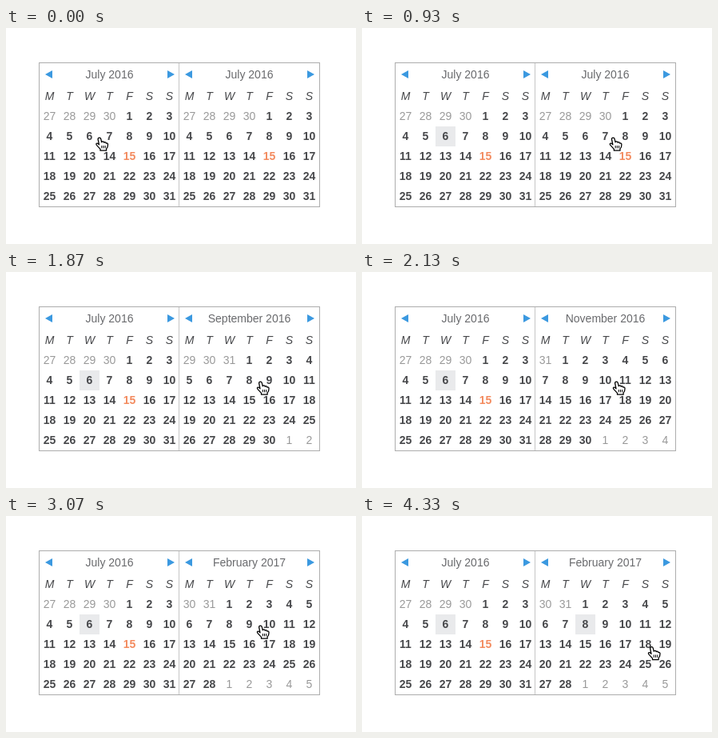
Write an HTML page with a canvas that moves like this. It is 438 px wide and 270 px high and loops after 4.39 s.

```html
<!DOCTYPE html>
<html lang="en">
<head>
<meta charset="utf-8">
<title>Date range picker</title>
<style>
  html, body { margin: 0; width: 100%; height: 100%; overflow: hidden; background: #fff; }
  canvas { display: block; width: 438px; height: 270px; }
</style>
</head>
<body>
<canvas id="stage" width="438" height="270"></canvas>
<script>
const ctx = document.getElementById('stage').getContext('2d');
const LOOP = 4390;
const CELL = 25;
const LEFT = 42, RIGHT = 217, TOP = 43;
const FONT = '14px "Liberation Sans", Arial, Helvetica, sans-serif';
const MONTHS = ['January', 'February', 'March', 'April', 'May', 'June', 'July',
  'August', 'September', 'October', 'November', 'December'];
const COLORS = { day: '#47484b', faint: '#999', title: '#696a6d', today: '#f38b5f',
  arrow: '#3b99e0', selected: '#e9eaec', border: '#adadad', divider: '#c6c6c6' };

const JULY = 6;
const FLIP_START = 1525, FLIP_EVERY = 200, FLIPS = 7;
const CLICKS = [{ at: 65, x: 117, y: 136 }, { at: 3665, x: 283, y: 135.5 }];
const CLICK_TIME = 460, SELECT_DELAY = 130;

const easeInOut = p => p < .5 ? 4 * p ** 3 : 1 - 4 * (1 - p) ** 3;
const easeIn = p => p * p;
const MOVES = [
  { from: 600, to: 1000, x: 318.5, y: 137, ease: easeInOut },
  { from: 3070, to: 3530, x: 283, y: 136, ease: easeInOut },
  { from: 4200, to: 4330, x: 362.5, y: 163.5, ease: easeIn }
];

const HAND = new Path2D('M-1.9 2C-2.1-.3 1.4-.5 1.8 1.8L2.7 5.6C3.6 4.4 5.4 4.8 5.7 6.2' +
  'C6.7 5.2 8.2 5.8 8.4 7.2C9.6 6.5 10.7 7.4 10.5 9L10 12L8.6 14V16.2H1V14.4' +
  'L-3.6 9.4C-5 7.5-3 6.2-1.5 7.9L-.5 8.9Z');
const KNUCKLES = new Path2D('M2.8 10V13.3M5 10V13.3M7.2 10V13.3');

function label(text, x, baseline, color, style = '') {
  ctx.font = `${style} ${FONT}`;
  ctx.fillStyle = color;
  ctx.fillText(text, x, baseline);
}

function arrow(tip, back) {
  ctx.fillStyle = COLORS.arrow;
  ctx.beginPath();
  ctx.moveTo(tip, 58);
  ctx.lineTo(back, 53);
  ctx.lineTo(back, 63);
  ctx.fill();
}

function monthInfo(month) {
  const first = new Date(Date.UTC(2016, month, 1));
  const offset = (first.getUTCDay() + 6) % 7;
  const length = new Date(Date.UTC(2016, month + 1, 0)).getUTCDate();
  return { first, offset, rows: Math.ceil((offset + length) / 7) };
}

function drawMonth(left, month, selected) {
  const { first, offset, rows } = monthInfo(month);
  const shown = first.getUTCMonth();
  const columnX = i => left + 12.5 + i * CELL;

  arrow(left + 7, left + 16);
  arrow(left + 169, left + 160);
  label(`${MONTHS[shown]} ${first.getUTCFullYear()}`, left + 87.5, 63, COLORS.title);
  [...'MTWTFSS'].forEach((d, i) => label(d, columnX(i), 90, COLORS.day, 'italic'));

  for (let i = 0; i < rows * 7; i++) {
    const date = new Date(Date.UTC(2016, month, 1 + i - offset));
    const day = date.getUTCDate();
    const inside = date.getUTCMonth() === shown;
    const col = i % 7, row = Math.floor(i / 7);
    if (inside && day === selected) {
      ctx.fillStyle = COLORS.selected;
      ctx.fillRect(left + col * CELL, 123 + (row - 1) * CELL, CELL, CELL);
    }
    const isToday = month === JULY && inside && day === 15;
    const color = isToday ? COLORS.today : inside ? COLORS.day : COLORS.faint;
    label(day, columnX(col), 115 + row * CELL, color, inside ? 'bold' : '');
  }
  return rows;
}

function drawFrame(rows) {
  const height = 56 + rows * CELL;
  ctx.fillStyle = COLORS.divider;
  ctx.fillRect(216, TOP, 1, height);
  ctx.lineWidth = 1;
  ctx.strokeStyle = COLORS.border;
  ctx.strokeRect(41.5, TOP + .5, 351, height - 1);
}

function drawRing({ at, x, y }, t) {
  const p = (t - at) / CLICK_TIME;
  if (p < 0 || p >= 1) return;
  ctx.globalAlpha = 1 - p;
  ctx.beginPath();
  ctx.arc(x, y, 29.3 + 42 * p, 0, Math.PI * 2);
  for (const [color, width] of [['#fff', 8], ['#000', 3.2]]) {
    ctx.strokeStyle = color;
    ctx.lineWidth = width;
    ctx.stroke();
  }
  ctx.globalAlpha = 1;
}

function cursorAt(t) {
  let x = 117, y = 137;
  for (const m of MOVES) {
    const p = m.ease(Math.min(1, Math.max(0, (t - m.from) / (m.to - m.from))));
    x += (m.x - x) * p;
    y += (m.y - y) * p;
  }
  return [x, y];
}

function drawCursor(t) {
  ctx.save();
  ctx.translate(...cursorAt(t));
  ctx.fillStyle = '#fff';
  ctx.strokeStyle = '#000';
  ctx.lineJoin = 'round';
  ctx.lineWidth = 1.3;
  ctx.fill(HAND);
  ctx.stroke(HAND);
  ctx.lineWidth = 1;
  ctx.stroke(KNUCKLES);
  ctx.restore();
}

function draw(t) {
  const flips = Math.floor((t - FLIP_START) / FLIP_EVERY) + 1;
  const month = JULY + Math.min(FLIPS, Math.max(0, flips));
  const picked = click => t >= click.at + SELECT_DELAY;

  ctx.fillStyle = '#fff';
  ctx.fillRect(0, 0, 438, 270);
  ctx.textAlign = 'center';
  drawMonth(LEFT, JULY, picked(CLICKS[0]) ? 6 : 0);
  const rows = drawMonth(RIGHT, month, picked(CLICKS[1]) ? 8 : 0);
  drawFrame(rows);
  CLICKS.forEach(click => drawRing(click, t));
  drawCursor(t);
}

const start = performance.now();
function tick() {
  draw((performance.now() - start) % LOOP);
  requestAnimationFrame(tick);
}
tick();
</script>
</body>
</html>
```
